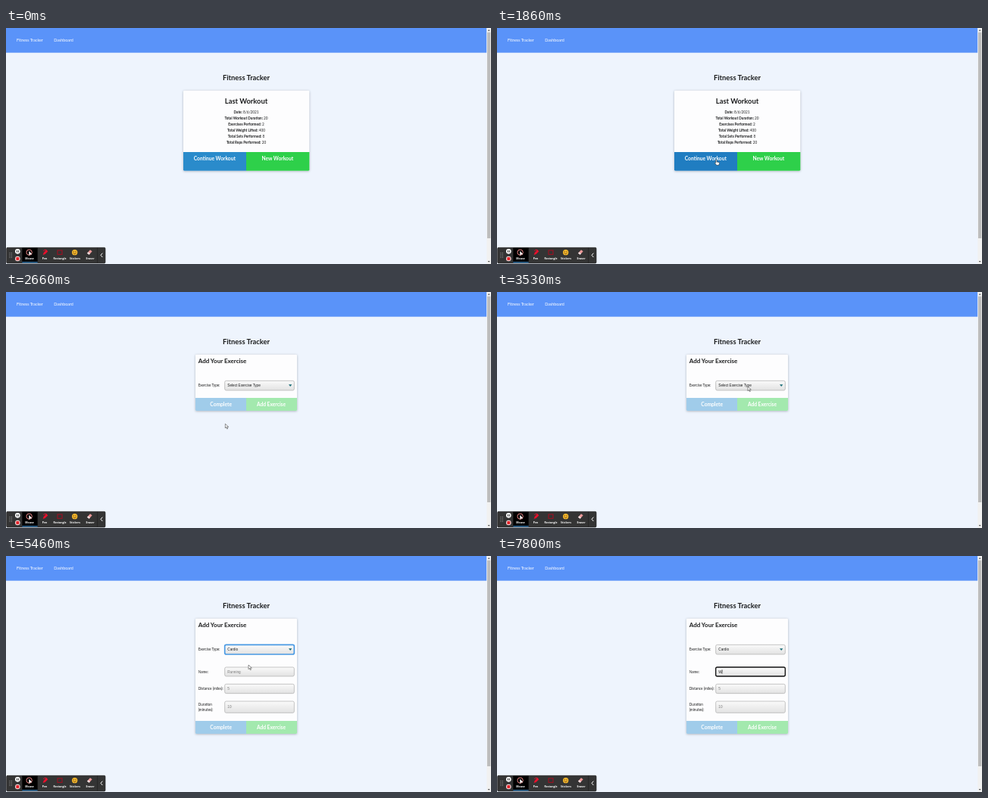
Animation, 640 px wide and 312 px high, one loop 8000 ms. Source, as an HTML page:

```html
<!DOCTYPE html>
<html lang="en">
<head>
<meta charset="utf-8">
<title>Fitness Tracker</title>
<style>
  html, body { margin: 0; width: 100%; height: 100%; overflow: hidden; background: #eef4fd; }
  svg { display: block; width: 640px; height: 312px; }
  text { font-family: Lato, sans-serif; font-size: 14px; fill: #1b1c1d; }
  .mid { text-anchor: middle; }
  .h1 { font-size: 28px; font-weight: 700; }
  .h2 { font-size: 24px; font-weight: 700; }
  .b { font-weight: 700; }
  .btn { font-size: 20px; font-weight: 700; text-anchor: middle; fill: #fff; }
  .nav { font-size: 16px; }
  .ui { font-family: "Liberation Sans", Arial, sans-serif; }
  .tool { font-family: "Open Sans", sans-serif; font-size: 10.5px; font-weight: 700; text-anchor: middle; fill: #fff; }
  .card { fill: #fdfdfe; filter: drop-shadow(0 2px 4px #a9b0bb); }
  .field { fill: url(#field); stroke: #aaa; stroke-width: 2; }
</style>
</head>
<body>
<svg viewBox="0 0 1920 936" xmlns="http://www.w3.org/2000/svg">
  <defs>
    <linearGradient id="field" x1="0" y1="0" x2="0" y2="1">
      <stop offset="0" stop-color="#fafafa"/>
      <stop offset="1" stop-color="#e2e2e2"/>
    </linearGradient>
  </defs>
  <rect width="1920" height="936" fill="#eef4fd"/>
  <rect width="1903" height="98" fill="#5a93f9"/>
  <text class="nav" x="42" y="55">Fitness Tracker</text>
  <text class="nav" x="190" y="55">Dashboard</text>
  <text class="h1 mid" x="951" y="207">Fitness Tracker</text>

  <g id="last">
    <rect class="card" x="702" y="248" width="499" height="318" rx="4"/>
    <text class="h1 mid" x="951" y="301">Last Workout</text>
    <g id="stats"></g>
    <path id="goOn" d="M702 492h249v74h-245q-4 0-4-4z"/>
    <path d="M951 492h250v70q0 4-4 4h-246z" fill="#2ed04a"/>
    <text class="btn" x="826" y="525">Continue Workout</text>
    <text class="btn" x="1075" y="525">New Workout</text>
  </g>

  <g id="add">
    <rect id="card" class="card" x="750" y="248" width="402" rx="4"/>
    <text class="h2" x="761" y="282">Add Your Exercise</text>
    <text x="761" y="376">Exercise Type:</text>
    <rect class="field" id="select" x="866" y="352" width="275" height="38" rx="6"/>
    <text class="ui" id="choice" x="877" y="376"></text>
    <path d="M1119 367h13l-6.500 8z" fill="#176b76"/>
    <g id="cardio"></g>
    <g id="buttons">
      <path id="done" d="M750 0h201v51h-197q-4 0-4-4z"/>
      <path id="more" d="M951 0h201v47q0 4-4 4h-197z"/>
      <text class="btn" x="851" y="33">Complete</text>
      <text class="btn" x="1050" y="33">Add Exercise</text>
    </g>
  </g>

  <g id="bar">
    <rect x="1903" width="17" height="936" fill="#f1f1f1"/>
    <rect x="1905" y="17" width="13" height="817" fill="#bdbdbd"/>
    <path d="M1907 11h9l-4.500-5zM1907 924h9l-4.500 5z" fill="#505050"/>
  </g>

  <g id="tools">
    <rect x="2" y="871" width="391" height="62" rx="4" fill="#343434" stroke="#222" stroke-width="2"/>
    <g id="grip" fill="#999"></g>
    <circle cx="46" cy="886" r="10" fill="#fff"/>
    <path d="M43 882v8M49 882v8" stroke="#333" stroke-width="3"/>
    <circle cx="46" cy="915" r="10" fill="#f3d9d9"/>
    <rect x="40" y="909" width="12" height="12" rx="2" fill="#e3242b"/>
    <rect x="64" y="872" width="61" height="58" fill="#000"/>
    <rect x="64" y="928" width="61" height="3" fill="#3b9ae8"/>
    <circle cx="92" cy="890" r="11" fill="none" stroke="#e88" stroke-width="3"/>
    <path d="M91 884v19l5-5h7z" fill="#fff"/>
    <path d="M146 900l3-9 11-11 6 6-11 11z" fill="#e8102c"/>
    <path d="M148 884q6-7 12-3" fill="none" stroke="#e8102c" stroke-width="3"/>
    <rect x="204" y="882" width="18" height="16" fill="none" stroke="#a80d20" stroke-width="3"/>
    <circle cx="272" cy="890" r="11" fill="#f6b92b"/>
    <path d="M266 887h4M274 887h4M266 892q6 8 12 0" fill="none" stroke="#69401a" stroke-width="2.500"/>
    <path d="M321 893l12-13 8 6-12 13z" fill="#ef9a9a"/>
    <path d="M321 893l4-4 8 6-4 4z" fill="#e8e0e0"/>
    <path d="M362 872v60" stroke="#1e1e1e" stroke-width="2"/>
    <path d="M382 893l-7 8 7 8" fill="none" stroke="#fff" stroke-width="3"/>
  </g>

  <g id="pointer">
    <path id="arrow" d="M0 0v17l4-4 3 7 3-1-3-7h6z" fill="#fff" stroke="#222" stroke-width="1.500"/>
    <path id="hand" d="M-2 1q2-3 4 0v7l9 2q2 1 1 5l-2 6h-9l-7-9q1-3 5 0z" fill="#fff" stroke="#222" stroke-width="1.500"/>
    <path id="beam" d="M-3 0h6M0 0v18M-3 18h6" fill="none" stroke="#222" stroke-width="1.500"/>
  </g>
</svg>
<script>
const LOOP = 8000;
const $ = id => document.getElementById(id);
const set = (el, attrs) => { for (const k in attrs) el.setAttribute(k, attrs[k]); };
const show = (el, on) => el.setAttribute('display', on ? 'inline' : 'none');
const clamp = v => Math.min(1, Math.max(0, v));
const mix = (a, b, p) => `rgb(${a.map((v, i) => Math.round(v + (b[i] - v) * p))})`;

const stats = [
  ['Date', '8/6/2021'], ['Total Workout Duration', 20], ['Exercises Performed', 2],
  ['Total Weight Lifted', 400], ['Total Sets Performed', 8], ['Total Reps Performed', 20]
];
$('stats').innerHTML = stats.map(([name, value], i) =>
  `<text class="mid" x="951" y="${338 + i * 24}"><tspan class="b">${name}:</tspan> ${value}</text>`).join('');

// label lines, top, height, placeholder
const fields = [
  [['Name:'], 441, 36, 'Running'],
  [['Distance (miles):'], 508, 37, '5'],
  [['Duration', '(minutes):'], 576, 46, '10']
];
$('cardio').innerHTML = fields.map(([lines, y, h, hint], i) => {
  const mid = y + h / 2 + 5;
  const top = mid - (lines.length - 1) * 9;
  return lines.map((s, j) => `<text x="761" y="${top + j * 19}">${s}</text>`).join('') +
    `<rect class="field" id="in${i}" x="866" y="${y}" width="275" height="${h}" rx="6"/>` +
    `<text class="ui" id="val${i}" x="877" y="${mid}" fill="#777" style="fill:#777">${hint}</text>`;
}).join('') + '<path id="caret" stroke="#111" stroke-width="2"/>';

let dots = '';
for (let i = 0; i < 8; i++) dots += `<circle cx="${15 + i % 2 * 7}" cy="${892 + (i >> 1) * 6}" r="1.700"/>`;
$('grip').innerHTML = dots;

[['Mouse', 93], ['Pen', 153], ['Rectangle', 213], ['Stickers', 273], ['Eraser', 333]].forEach(([name, x]) =>
  $('tools').insertAdjacentHTML('beforeend', `<text class="tool" x="${x}" y="917">${name}</text>`));

// time, x, y of the pointer tip
const path = [
  [530, 1540, 690], [700, 1210, 665], [930, 915, 631], [1260, 868, 523],
  [3060, 868, 523], [3530, 993, 375], [3860, 984, 391],
  [5200, 984, 391], [5460, 960, 432],
  [5930, 960, 432], [6000, 955, 449], [6400, 955, 449], [6460, 950, 451]
];

function pointAt(t) {
  const i = path.findIndex(p => p[0] > t);
  if (i < 0) return path[path.length - 1].slice(1);
  if (i === 0) return path[0].slice(1);
  const [a, b] = [path[i - 1], path[i]];
  const p = (t - a[0]) / (b[0] - a[0]);
  return [a[1] + (b[1] - a[1]) * p, a[2] + (b[2] - a[2]) * p];
}

const navs = document.querySelectorAll('.nav');
const labels = $('buttons').querySelectorAll('text');

function render(t) {
  const adding = t >= 2400, open = t >= 5200, typing = t >= 6260, typed = t >= 7800;
  show($('last'), !adding);
  show($('add'), adding);

  const hover = clamp((t - 1180) / 100);
  $('goOn').setAttribute('fill', mix([42, 139, 203], [32, 125, 193], hover));

  // the new page loads unstyled links and grey buttons, then colours them in
  const ready = adding ? clamp((t - 2460) / 200) : 1;
  navs.forEach(n => { n.style.fill = mix([85, 26, 139], [255, 255, 255], ready); });
  $('done').setAttribute('fill', mix([244, 246, 248], [160, 204, 234], ready));
  $('more').setAttribute('fill', mix([244, 246, 248], [163, 233, 174], ready));
  labels.forEach(n => { n.style.fill = mix([200, 201, 202], [255, 255, 255], ready); });

  const foot = open ? 654 : 420;
  $('buttons').setAttribute('transform', `translate(0 ${foot})`);
  $('card').setAttribute('height', foot + 51 - 248);
  show($('cardio'), open);
  $('choice').textContent = open ? 'Cardio' : 'Select Exercise Type';

  const ring = t >= 4200 && !typing;
  $('select').style.stroke = ring ? '#4a9ae4' : '#aaa';
  $('select').style.strokeWidth = ring ? 5 : 2;

  $('in0').style.stroke = typing ? '#111' : '#aaa';
  $('in0').style.strokeWidth = typing ? 4 : 2;
  $('val0').textContent = typed ? 'W' : 'Running';
  $('val0').style.fill = typed ? '#222' : '#777';
  const blink = Math.floor((t - 6260) / 535) % 2 === 0;
  show($('caret'), typing && (typed || blink));
  $('caret').setAttribute('d', `M${typed ? 891 : 877} 451v16`);

  const [x, y] = pointAt(t);
  $('pointer').setAttribute('transform', `translate(${x} ${y})`);
  show($('pointer'), t >= 530 && !typed);
  const hand = t >= 1180 && t < 2530, beam = t >= 6000;
  show($('hand'), hand);
  show($('beam'), beam);
  show($('arrow'), !hand && !beam);
}

const start = performance.now();
function tick(now) {
  render(Math.max(0, now - start) % LOOP);
  requestAnimationFrame(tick);
}
render(0);
requestAnimationFrame(tick);
</script>
</body>
</html>
```
